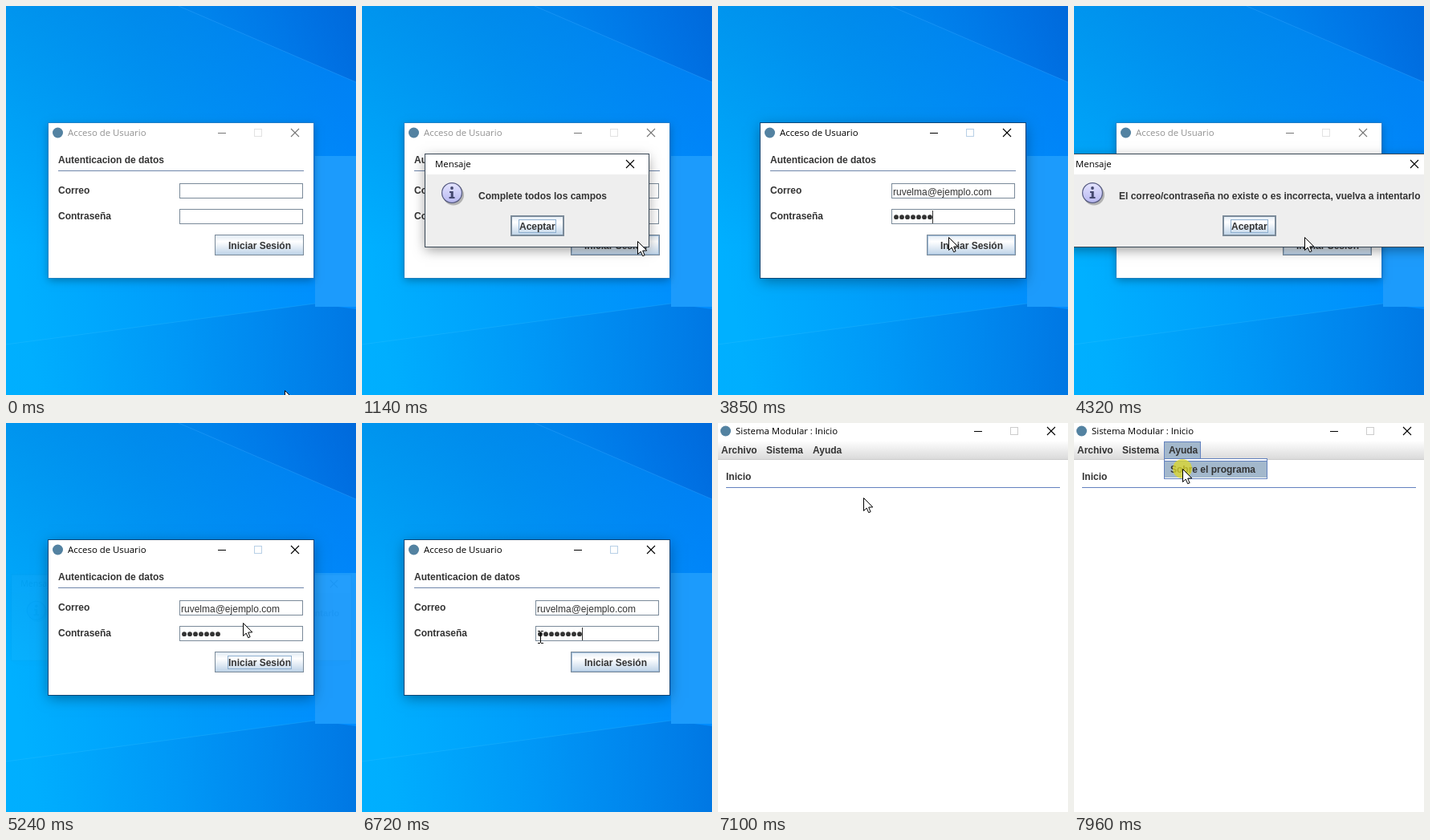
Recreate the animation shown at these times as an HTML page with a canvas. Size 436 px wide and 485 px high, loop 8000 ms.

```html
<!DOCTYPE html>
<html lang="es">
<head>
<meta charset="utf-8">
<title>Acceso de Usuario</title>
<style>
html, body { margin: 0; width: 100%; height: 100%; overflow: hidden; background: #0090f0; }
canvas { display: block; width: 436px; height: 485px; }
</style>
</head>
<body>
<canvas id="stage" width="436" height="485"></canvas>
<script>
const W = 436, H = 485, LOOP = 8000;
const stage = document.getElementById('stage').getContext('2d');
const buffer = Object.assign(document.createElement('canvas'), { width: W, height: H });
const off = buffer.getContext('2d');
let g = stage;

const BOLD = 'bold 12px "Liberation Sans", Arial, sans-serif';
const PLAIN = '12px "Liberation Sans", Arial, sans-serif';
const TITLE = '11.4px "Open Sans", "Noto Sans", sans-serif';
const EMAIL = 'ruvelma@ejemplo.com';

const LOGIN = { x: 260, y: 285, w: 111, h: 26 };
const ACCEPT = { x: 185, y: 261, w: 67, h: 26 };
const MAIL = { x: 216, y: 221, w: 154, h: 19 };
const PASS = { x: 216, y: 253, w: 154, h: 19 };

const MOVE = 130, HOLD = 130, FADE = 180;
const PASTE = 2140, ENTER = 6870, MENU = 7330;

// Pointer stops: arrival time, x, y
const STOPS = [
  [200, 343, 293], [1960, 262, 227], [2290, 252, 263], [3780, 287, 288],
  [4550, 244, 274], [5240, 295, 249], [5400, 288, 262], [5790, 320, 296],
  [6490, 222, 267], [6950, 202, 124], [7180, 140, 34], [7640, 135, 57]
];
const CLICKS = [360, 1990, 2290, 3860, 4860, 5400, 6020, 6490, 7250, 7960];
const DIALOGS = [
  { open: 590, close: 1380, text: 'Complete todos los campos' },
  { open: 4080, close: 5090, text: 'El correo/contraseña no existe o es incorrecta, vuelva a intentarlo' },
  { open: 6180, close: 6540, text: 'Bienvenido al sistema' }
];

const clamp = v => Math.max(0, Math.min(1, v));
const easeOut = p => 1 - (1 - p) ** 3;
const smooth = p => p * p * (3 - 2 * p);
const inside = ([px, py], r) => px > r.x && px < r.x + r.w && py > r.y && py < r.y + r.h;

function pointerAt(t) {
  let x = 347, y = 479;
  for (const [at, sx, sy] of STOPS) {
    const p = smooth(clamp((t - at + MOVE) / MOVE));
    x += (sx - x) * p;
    y += (sy - y) * p;
  }
  return [x, y];
}

// One keystroke every 145 ms, and one more on the second try
function keysTyped(t) {
  const first = Math.floor((t - 2600) / 145) + 1;
  return Math.max(0, Math.min(7, first)) + (t >= 5640 ? 1 : 0);
}

function stateAt(t) {
  const at = pointerAt(t);
  const last = CLICKS.filter(c => c <= t).pop();
  const modal = DIALOGS.some(d => t >= d.open && t < d.close);
  return {
    t, at, modal,
    active: t >= DIALOGS[0].close && !modal,
    down: t - last < HOLD,
    clicked: last === undefined ? [0, 0] : pointerAt(last)
  };
}

function fill(x, y, w, h, color) {
  g.fillStyle = color;
  g.fillRect(x, y, w, h);
}

function frame(x, y, w, h, color) {
  g.strokeStyle = color;
  g.lineWidth = 1;
  g.strokeRect(x + .5, y + .5, w - 1, h - 1);
}

function text(s, x, y, font = BOLD, color = '#333') {
  g.font = font;
  g.fillStyle = color;
  g.fillText(s, x, y);
}

function widthOf(s, font) {
  g.font = font;
  return Math.round(g.measureText(s).width);
}

function line(x0, y0, x1, y1, color, width = 1) {
  g.strokeStyle = color;
  g.lineWidth = width;
  g.beginPath();
  g.moveTo(x0, y0);
  g.lineTo(x1, y1);
  g.stroke();
}

function shape(points, color) {
  g.fillStyle = color;
  g.beginPath();
  points.forEach(([x, y]) => g.lineTo(x, y));
  g.closePath();
  g.fill();
}

function disc(x, y, r, color) {
  g.fillStyle = color;
  g.beginPath();
  g.arc(x, y, r, 0, 7);
  g.fill();
}

function ramp(x0, y0, x1, y1, ...colors) {
  const r = g.createLinearGradient(x0, y0, x1, y1);
  colors.forEach((c, i) => r.addColorStop(i / (colors.length - 1), c));
  return r;
}

// Draws a group as one sheet, scaled about a centre and then faded
function layer(alpha, scale, cx, cy, draw) {
  if (alpha >= 1) return draw();
  off.clearRect(0, 0, W, H);
  off.save();
  off.translate(cx, cy);
  off.scale(scale, scale);
  off.translate(-cx, -cy);
  g = off;
  draw();
  g = stage;
  off.restore();
  g.globalAlpha = alpha;
  g.drawImage(buffer, 0, 0);
  g.globalAlpha = 1;
}

function panel(x, y, w, h, blur, depth) {
  g.save();
  g.shadowColor = `rgba(0,0,0,${depth})`;
  g.shadowBlur = blur;
  g.shadowOffsetY = blur / 4;
  fill(x, y, w, h, '#fff');
  g.restore();
}

function desktop() {
  fill(0, 0, W, H, ramp(0, 300, W, 200, '#00b0ff', '#009afa', '#0089ff'));
  fill(0, 0, W, 300, ramp(0, 0, 0, 300, 'rgba(0,105,205,.32)', 'rgba(0,105,205,0)'));
  shape([[215, 0], [W, 0], [W, 95]], ramp(260, 60, W, 0, 'rgba(0,110,225,.1)', 'rgba(0,100,214,.8)'));
  line(215, 0, W, 95, 'rgba(60,170,255,.35)');
  shape([[385, 371], [W, 378], [W, H], [0, H], [0, 422]],
    ramp(0, 430, W, 440, 'rgba(0,160,245,.05)', 'rgba(0,135,235,.3)', 'rgba(0,112,218,.75)'));
  line(385, 371, 0, 422, 'rgba(60,195,255,.25)');
  fill(385, 187, 188, 188, '#1c9bfc');
}

function captionButtons(x, y, ink, box) {
  line(x - 96, y + .5, x - 86, y + .5, ink);
  frame(x - 51, y - 5, 10, 10, box);
  cross(x, y, ink);
}

function cross(x, y, ink) {
  line(x - 5, y - 5, x + 5, y + 5, ink, 1.1);
  line(x + 5, y - 5, x - 5, y + 5, ink, 1.1);
}

function button({ x, y, w, h }, label, look) {
  const tw = widthOf(label, BOLD), tx = Math.round(x + (w - tw) / 2);
  fill(x, y, w, h, look.pressed ? '#b8cfe5'
    : ramp(0, y, 0, y + h, '#dde8f3', '#fff', '#dde8f3', '#b8cfe5'));
  frame(x, y, w, h, '#7a8a99');
  if (look.inner) frame(x + 1, y + 1, w - 2, h - 2, look.inner);
  text(label, tx, y + 18);
  if (look.focus) frame(tx - 1, y + 5, tw + 2, 17, '#8fb0d0');
}

function field({ x, y, w, h }) {
  fill(x, y, w, h, '#fff');
  frame(x, y, w, h, '#7a8a99');
}

function caret(x, y) {
  line(x + .5, y, x + .5, y + 16, '#333');
}

function login({ t, at, modal, active, down, clicked }) {
  panel(53, 146, 330, 193, active ? 16 : 10, active ? .36 : .32);
  frame(52, 145, 332, 195, active ? 'rgba(15,60,105,.85)' : 'rgba(60,120,175,.5)');
  disc(64.5, 158, 6.5, '#5382a1');
  text('Acceso de Usuario', 77, 162, TITLE, active ? '#000' : '#929292');
  captionButtons(360, 158, active ? '#000' : '#777', active ? '#b8d0e6' : '#e2e2e2');
  text('Autenticacion de datos', 65, 196);
  line(65, 205.5, 371, 205.5, '#6f86ab');
  text('Correo', 65, 234);
  text('Contraseña', 65, 266);
  field(MAIL);
  field(PASS);

  const mail = t >= PASTE ? EMAIL : '';
  const n = keysTyped(t);
  text(mail, 218, 236, PLAIN);
  for (let i = 0; i < n; i++) disc(222 + 7 * i, 263.2, 2.9, '#333');
  const inMail = inside(clicked, MAIL), inPass = inside(clicked, PASS);
  if (active && inMail) caret(218 + widthOf(mail, PLAIN), 223);
  if (active && inPass) caret(218 + 7 * n, 255);

  const over = inside(at, LOGIN), done = t >= DIALOGS[2].open;
  button(LOGIN, 'Iniciar Sesión', {
    pressed: over && down && !modal,
    inner: (over || modal || done) && '#9dbad8',
    focus: active && !inMail && !inPass && !done
  });
}

function dialog(d, { at, down }) {
  const w = Math.max(278, widthOf(d.text, BOLD) + 82), x = Math.round(218 - w / 2);
  panel(x, 185, w, 115, 14, .4);
  fill(x, 210, w, 90, '#eee');
  frame(x - 1, 184, w + 2, 117, '#3c4a58');
  text('Mensaje', x + 12, 201, TITLE, '#000');
  cross(x + w - 23, 197, '#000');
  const cx = x + 33;
  disc(cx + 2, 235.5, 13, 'rgba(0,0,0,.25)');
  disc(cx, 233, 13, '#555a80');
  disc(cx, 233, 11.8, ramp(0, 221, 0, 245, '#e4e4ff', '#b8b8f0'));
  disc(cx, 227, 1.9, '#44486e');
  fill(cx - 3, 231, 4, 2, '#44486e');
  fill(cx - 1.3, 231, 3, 8, '#44486e');
  fill(cx - 3.5, 238, 7, 2, '#44486e');
  text(d.text, x + 66, 241);
  button(ACCEPT, 'Aceptar', { pressed: down && inside(at, ACCEPT), inner: '#7a8a99', focus: true });
}

function mainWindow({ t }) {
  fill(-1.5, -1.5, 439.5, 487, '#fff');
  disc(9.5, 10, 6.5, '#5382a1');
  text('Sistema Modular : Inicio', 22, 14, TITLE, '#000');
  captionButtons(415, 10, '#000', '#ccc');
  fill(-1, 22, 438, 23, ramp(0, 22, 0, 45, '#fff', '#dadada'));
  line(-1, 45.5, 437, 45.5, '#ccc');
  const open = t >= MENU;
  if (open) {
    fill(112, 23, 46, 22, '#a3b8cc');
    frame(112, 23, 46, 22, '#6382bf');
  }
  text('Archivo', 4, 38);
  text('Sistema', 60, 38);
  text('Ayuda', 118, 38);
  text('Inicio', 10, 71);
  line(10, 80.5, 426, 80.5, '#6382bf');
  if (open) {
    fill(112, 44, 129, 26, '#fff');
    if (pointerAt(t)[1] > 46) fill(113, 47, 127, 21, '#a3b8cc');
    frame(112, 44, 129, 26, '#6382bf');
    line(113, 47.5, 240, 47.5, '#6382bf');
    text('Sobre el programa', 120, 62);
  }
  frame(-2, -2, 440, 488, '#3f7fae');
}

function beam(x, y) {
  x = Math.round(x) + .5;
  y = Math.round(y);
  line(x, y - 6, x, y + 7, '#000');
  for (const v of [y - 7.5, y + 7.5]) {
    line(x - 3.5, v, x - .5, v, '#000');
    line(x + .5, v, x + 3.5, v, '#000');
  }
}

function arrow(x, y) {
  g.save();
  g.translate(Math.round(x) + .5, Math.round(y) + .5);
  shape([[0, 0], [0, 16], [3.7, 12.6], [6.2, 18.2], [8.6, 17.2], [6.2, 11.6], [11.3, 11.4]], '#fff');
  g.strokeStyle = '#000';
  g.lineWidth = 1;
  g.stroke();
  g.restore();
}

function pointer({ t, at, modal, down }) {
  if (down) disc(...at, 12, 'rgba(222,216,40,.75)');
  const typing = !modal && t < ENTER && (inside(at, MAIL) || inside(at, PASS));
  (typing ? beam : arrow)(...at);
}

function drawDialogs(s) {
  for (const d of DIALOGS) {
    const out = clamp((s.t - d.close) / FADE);
    const into = easeOut(clamp((s.t - d.open + 40) / 200));
    if (s.t < d.open || out === 1) continue;
    layer(out ? (1 - out) ** 2 : into, out ? 1 - .09 * out : .95 + .05 * into, 218, 243, () => dialog(d, s));
  }
}

function render(t) {
  const s = stateAt(t);
  const gone = clamp((t - ENTER) / 100);
  desktop();
  if (!s.modal) drawDialogs(s);
  if (gone < 1) layer((1 - gone) ** 1.5, 1 - .06 * gone, 218, 243, () => login(s));
  if (s.modal) drawDialogs(s);
  if (t >= ENTER) {
    const p = easeOut(clamp((t - ENTER) / 200));
    layer(p, .95 + .05 * p, 190, 200, () => mainWindow(s));
  }
  pointer(s);
}

const start = performance.now();
function tick() {
  render((performance.now() - start) % LOOP);
  requestAnimationFrame(tick);
}
tick();
</script>
</body>
</html>
```
